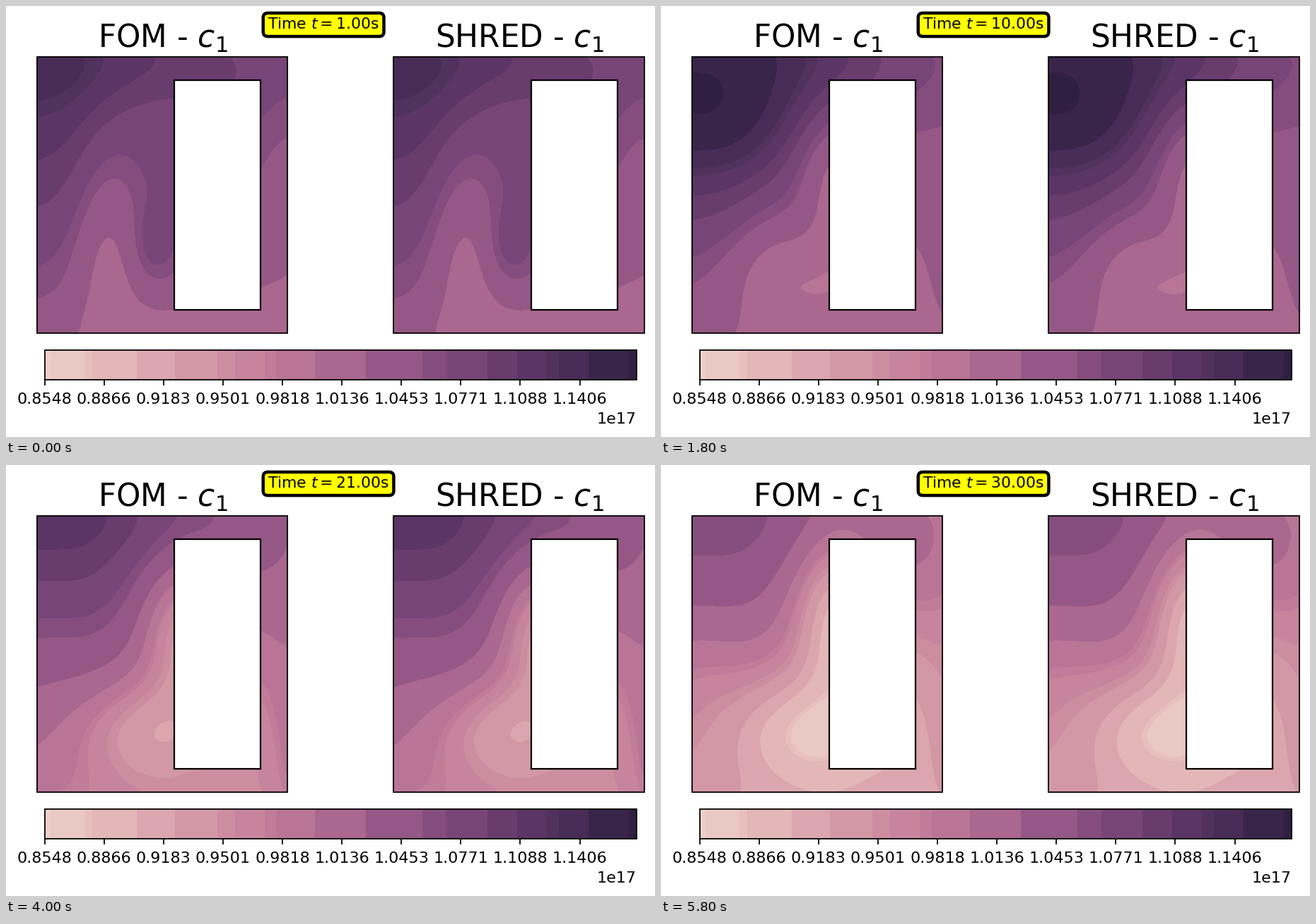
Recreate the animation shown at these times as a matplotlib script. Size 918x610 px, loop 6000 ms.

```python
import numpy as np
import matplotlib.pyplot as plt
from matplotlib.animation import FuncAnimation
from matplotlib.patches import Rectangle

W, H, DPI = 918, 610, 160
FRAMES, STEP = 30, 200
LEFT, RIGHT, TOP, BOTTOM = 43.6, 398.4, 72, 463
SHIFT = 504.5
BAR_L, BAR_R = 55, 891.5

# Band limits, measured along the colour bar; field values use the same scale.
EDGES = [55, 63, 111, 122, 185, 239, 299, 324, 366, 383, 437, 509, 589,
         623, 681, 723, 765, 782, 824, 881, 891.5]


def cubehelix(f):
    x = 0.85 - 0.7 * f
    a = 0.4 * x * (1 - x)
    phi = 0.8 * np.pi * x
    c, s = np.cos(phi), np.sin(phi)
    rgb = (x + a * (-0.14861 * c + 1.78277 * s),
           x + a * (-0.29227 * c - 0.90649 * s),
           x + a * 1.97294 * c)
    return tuple(np.clip(rgb, 0, 1))


COLORS = [cubehelix(((a + b) / 2 - BAR_L) / (BAR_R - BAR_L))
          for a, b in zip(EDGES, EDGES[1:])]

X, Y = np.meshgrid(np.linspace(LEFT, RIGHT, 237), np.linspace(TOP, BOTTOM, 262))


def bump(cx, cy, sx, sy, y=Y):
    return np.exp(-((X - cx) / sx) ** 2 / 2 - ((y - cy) / sy) ** 2 / 2)


def ramp(start, reach, y=Y):
    """Rise to the right of start, fading with depth."""
    return 12 * np.logaddexp(0, (X - start) / 12) * (1 - (y - TOP) / reach)


def early(t):
    """Folded field: a cool nose beside a warm tongue along the block."""
    y = Y + 7.5 * max(4 - t, 0) * np.exp(-((Y - 210) / 140) ** 2)
    v = 925 - 0.8 * y - 75 * np.exp((TOP - y) / 45) - 0.5 * ramp(90, 1000, y)
    v -= 128 * bump(145, 350, 36, 95, y)
    v += 75 * bump(208, 350, 25, 35, y)
    v -= 55 * bump(205, 175, 60, 60, y)
    v -= 40 * bump(270, 455, 100, 25, y)
    v -= 35 * bump(385, 190, 40, 80, y)
    return v


def late(t):
    """Cooling field: cold film on the block's left face and a cold pool below."""
    g = np.interp(t, [18, 30], [0, 1])
    v = 885 - 0.97 * Y - 25 * np.exp((TOP - Y) / 25) - 0.88 * ramp(115, 530)
    v -= (232 + 50 * g) * bump(250, 235 - 20 * g, 42, 65 + 15 * g)
    v -= (180 + 30 * g) * bump(205, 375, 75, 55)
    v -= 38 * bump(345, 300, 30, 120)
    v += 60 * bump(410, 420, 22, 90)
    v -= np.interp(t, [14, 30], [0, 48]) * bump(50, 290, 70, 60)
    heat = np.interp(t, [10, 14, 30], [95, 56, -168])
    return v + heat * (1 - 0.4 * bump(350, 130, 70, 80))


def field(t):
    mix = np.interp(t, [4, 10, 14], [0, 0.75, 1])
    pulse = np.interp(t, [1, 4, 10, 18], [-10, 0, 64, 0])
    return (1 - mix) * early(t) + mix * late(t) + pulse * bump(60, 168, 90, 50)


plt.rcParams["font.family"] = "DejaVu Sans"
fig = plt.figure(figsize=(W / DPI, H / DPI), dpi=DPI, facecolor="white")
ax = fig.add_axes([0, 0, 1, 1])
ax.set_xlim(0, W)
ax.set_ylim(H, 0)
ax.axis("off")


def box(x0, y0, x1, y1, lw=0.8, **kw):
    ax.add_patch(Rectangle((x0, y0), x1 - x0, y1 - y0, ec="black", lw=lw, **kw))


for name, dx in (("FOM", 0), ("SHRED", SHIFT)):
    box(LEFT + dx, TOP, RIGHT + dx, BOTTOM, fc="none", zorder=4)
    box(238.4 + dx, 105, 360.4 + dx, 430, lw=1, fc="white", zorder=3)
    ax.text(221.5 + dx, 59.3, f"{name} - $c_1$", size=19.7, ha="center")

for a, b, color in zip(EDGES, EDGES[1:], COLORS):
    ax.add_patch(Rectangle((a, 487), b - a, 42, fc=color, lw=0, antialiased=False))
box(BAR_L, 487, BAR_R, 529, fc="none", zorder=4)
for i in range(10):
    x = 54.6 + 84.1 * i
    ax.plot([x, x], [529, 536.8], color="black", lw=0.8, solid_capstyle="butt")
    ax.text(x, 562.8, f"{0.8548 + 0.031753 * i:.4f}", size=10, ha="center")
ax.text(BAR_R, 590.8, "1e17", size=10, ha="right")

clock = ax.text(370.3, 26.5, "", size=9.85, va="center", zorder=5,
                bbox=dict(boxstyle="round", fc="yellow", ec="black", lw=2))

limits = [-1e4] + EDGES[1:-1] + [1e4]
shown = []


def draw(k):
    while shown:
        shown.pop().remove()
    t = k + 1
    z = field(t)
    for dx in (0, SHIFT):
        shown.append(ax.contourf(X + dx, Y, z, levels=limits, colors=COLORS, zorder=1))
    clock.set_text(f"Time $t = {t:.2f}$s")


anim = FuncAnimation(fig, draw, frames=FRAMES, interval=STEP, repeat=True, repeat_delay=0)
plt.show()
```
